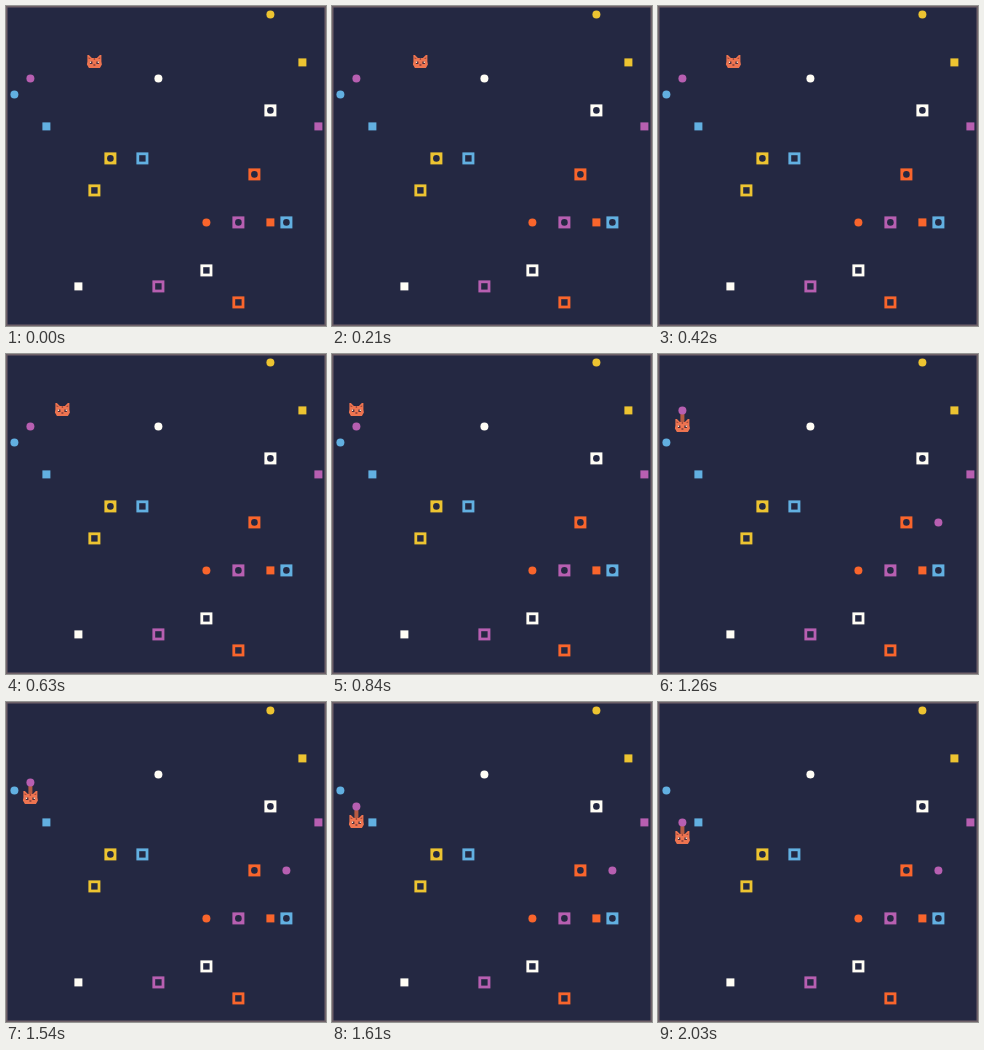
An HTML page for the animation above (2100 ms loop, 320x320 px).

```html
<!DOCTYPE html>
<html lang="en">
<head>
<meta charset="utf-8">
<style>
  html, body { margin: 0; width: 100%; height: 100%; overflow: hidden; background: #242842; }
  svg { display: block; width: 100vw; height: 100vh; }
</style>
</head>
<body>
<svg viewBox="0 0 320 320">
  <rect width="320" height="320" fill="#242842"/>
  <g transform="translate(.4 .4)">
    <g id="board"></g>
    <circle id="spawn" cx="280" cy="168" r="4" fill="#b75fb1"/>
    <rect id="tail" x="-2" width="4" height="12" fill="#b75a42"/>
    <circle id="ball" r="4" fill="#b75fb1"/>
    <g id="cat">
      <path d="M-7-7.5 H-5.5 L-2.5-4.5 H2.5 L5.5-7.5 H7 V-1 L7.5 2 L5.5 5.5 H-5.5 L-7.5 2 L-7-1Z" fill="#ee7450"/>
      <path d="M-5.8-5.5 L-3.5-3.5 H-5.8Z M5.8-5.5 L3.5-3.5 H5.8Z M-.7-4.5 H.7 V-2.5 H-.7Z" fill="#a54c3c"/>
      <g id="open">
        <path d="M-4.5-1 H-2 V1.5 H-4.5Z M2-1 H4.5 V1.5 H2Z" fill="#4a2d3c"/>
        <path id="glints" d="M-4.5-1 H-3.3 V.5 H-4.5Z M3.3-1 H4.5 V.5 H3.3Z" fill="#ffe6cd"/>
      </g>
      <path id="shut" d="M-4.5 .5 H-2 M2 .5 H4.5" stroke="#4a2d3c"/>
      <path d="M-1 2 H1 V3.2 H-1Z" fill="#652f35"/>
    </g>
  </g>
  <rect x=".75" y=".75" width="318.5" height="318.5" fill="none" stroke="#70636a" stroke-width="1.5"/>
</svg>
<script>
const LOOP = 2100, TICK = 70, CELL = 16;
const colors = { y: '#edc431', b: '#62b0e1', p: '#b75fb1', o: '#f9652c', w: '#fffdf5' };
const $ = id => document.getElementById(id);

// color, shape, column, row
const pieces = `y dot 16 0, y box 18 3, w dot 9 4, b dot 0 5,
  w hole 16 6, b box 2 7, p box 19 7, y hole 6 9, b ring 8 9,
  o hole 15 10, y ring 5 11, o dot 12 13, p hole 14 13, o box 16 13,
  b hole 17 13, w ring 12 16, w box 4 17, p ring 9 17, o ring 14 18`;

function pieceMarkup(piece) {
  const [color, shape, col, row] = piece.trim().split(' ');
  const x = col * CELL + 8, y = row * CELL + 8, fill = colors[color];
  const square = (size, paint) =>
    `<rect x="${x - size / 2}" y="${y - size / 2}" width="${size}" height="${size}" fill="${paint}"/>`;
  const circle = (r, paint) => `<circle cx="${x}" cy="${y}" r="${r}" fill="${paint}"/>`;
  if (shape === 'dot') return circle(4, fill);
  if (shape === 'box') return square(8, fill);
  return square(12, fill) + (shape === 'ring' ? square(6.4, '#242842') : circle(3.3, '#242842'));
}
$('board').innerHTML = pieces.split(',').map(pieceMarkup).join('');

// [time, value], linear between entries
const catX = [[280, 88], [630, 56], [840, 24]];
const catY = [[980, 56], [1260, 72], [1470, 72], [1610, 120], [1750, 120], [2030, 136]];

function valueAt(track, t) {
  const next = track.findIndex(([time]) => time > t);
  if (next < 0) return track[track.length - 1][1];
  if (next === 0) return track[0][1];
  const [t0, a] = track[next - 1], [t1, b] = track[next];
  return a + (b - a) * (t - t0) / (t1 - t0);
}

const show = (id, on) => $(id).setAttribute('visibility', on ? 'visible' : 'hidden');
const place = (id, x, y) => $(id).setAttribute('transform', `translate(${x} ${y})`);

function draw(now) {
  const t = Math.floor(now % LOOP / TICK) * TICK;
  const x = Math.round(valueAt(catX, t)), y = Math.round(valueAt(catY, t));
  const caught = t >= 1050;
  const ballY = caught ? y - CELL : 72;
  const blink = t === 140 || t === 1120;
  place('cat', x, y);
  place('ball', 24, ballY);
  place('tail', x, ballY);
  $('spawn').setAttribute('r', 4 * Math.min(1, Math.max(0, (t - 980) / 210)));
  show('tail', caught);
  show('open', !blink);
  show('shut', blink);
}

const start = performance.now();
function frame() {
  draw(performance.now() - start);
  requestAnimationFrame(frame);
}
draw(0);
requestAnimationFrame(frame);
</script>
</body>
</html>
```
